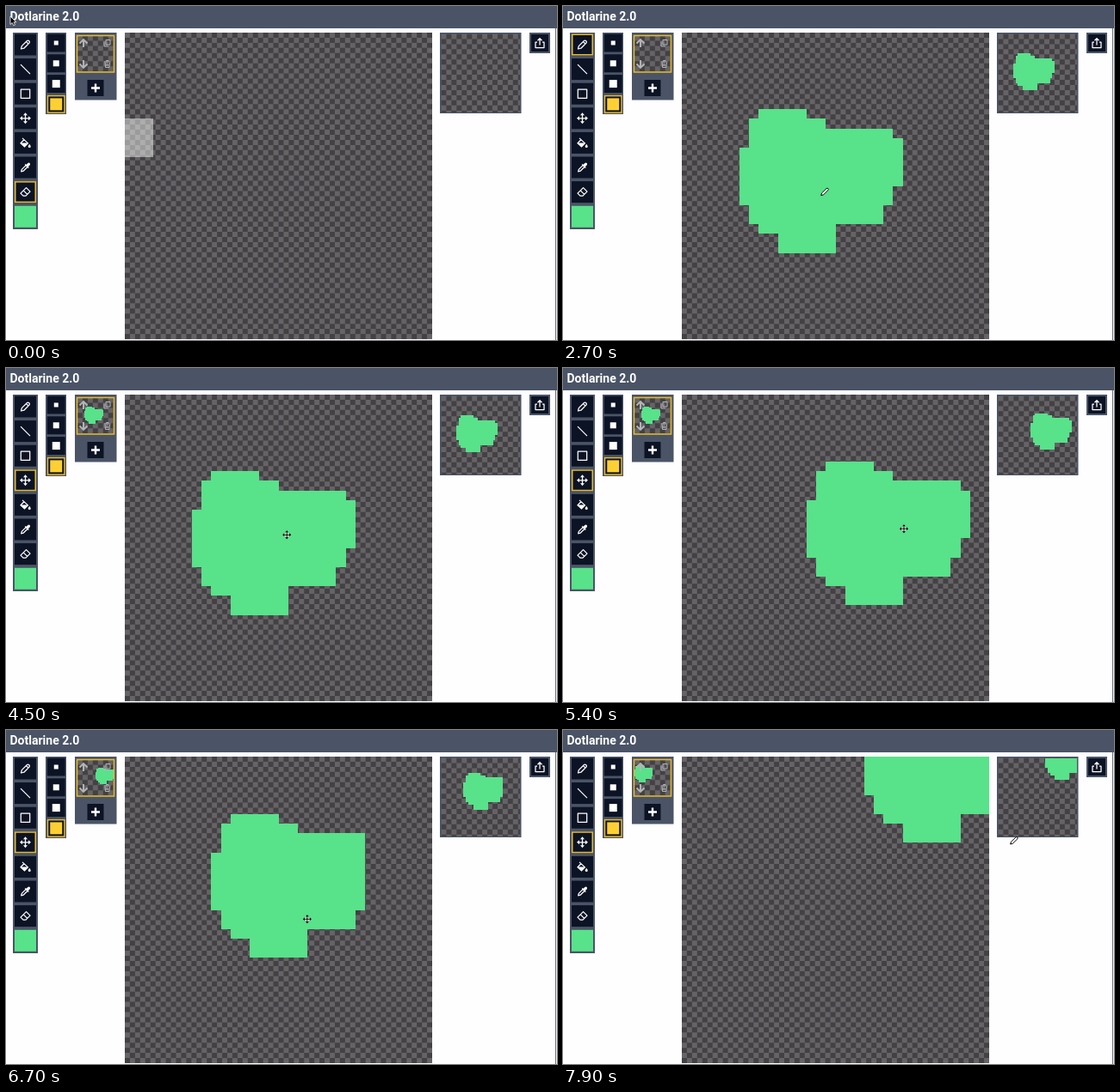
An HTML page that plays this animation: 640 by 389 pixels, repeating every 8000 ms.

```html
<!DOCTYPE html>
<html lang="en">
<head>
<meta charset="utf-8">
<title>Dotlarine 2.0</title>
<style>
  html, body { margin: 0; width: 100%; height: 100%; overflow: hidden; background: #fefdff; }
  #stage { display: block; width: 640px; height: 389px; }
  .slate { fill: #4a5466; }
  .dark { fill: #0c1324; }
  .gold { fill: none; stroke: #e8bb2e; stroke-width: 1.5; }
  .line { fill: none; stroke: #fff; stroke-width: 1.25; stroke-linejoin: round; }
  .solid { fill: #fff; }
  .dim { fill: none; stroke: #b4b6ba; stroke-width: 1; }
  .dim .bold { stroke-width: 1.9; }
  .green { fill: #58e28a; }
  .base { fill: #656366; }
  .tile { fill: #434144; }
  .art, #hover { shape-rendering: crispEdges; }
  text { font: 700 14px Roboto, Arial, sans-serif; fill: #fff; }
</style>
</head>
<body>
<svg id="stage" viewBox="0 0 640 389">
  <rect x="638" width="1" height="389" fill="#666c78"/>
  <rect class="slate" width="640" height="26"/>
  <text x="4.5" y="17">Dotlarine 2.0</text>

  <!-- Tools -->
  <rect class="slate" x="8" y="31" width="29" height="229"/>
  <g id="tools"></g>
  <rect class="green" x="10" y="232.8" width="25" height="25"/>
  <rect id="picked" class="gold" x="10.75" width="23.5" height="23.5"/>

  <!-- Brush sizes -->
  <rect class="slate" x="46" y="31" width="24" height="95"/>
  <g id="sizes"></g>
  <rect class="gold" x="48.5" y="104.65" width="19.5" height="19.5"/>

  <!-- Frame list -->
  <rect class="slate" x="80" y="31" width="48.5" height="78.5"/>
  <svg id="thumb" x="83" y="34.5" width="42" height="42" viewBox="0 0 32 32"></svg>
  <rect class="gold" x="82.5" y="34.5" width="43" height="42.5"/>
  <g class="dim">
    <path class="bold" d="M90 48v-9M85.5 43.5L90 39l4.500 4.500M90 63v9M85.500 67.500L90 72l4.500-4.500"/>
    <path d="M116 39.500h5v5.500h-5zM114 41.500v5.500h5"/>
    <path d="M114 65h7.500M116.500 64.500v-1h2.500v1M115 66l.5 5.500h4.500l.5-5.500M116.800 67.500v2.500M118.700 67.500v2.500"/>
  </g>
  <rect class="dark" x="94.5" y="86" width="19" height="19"/>
  <path d="M104 90.500v10M99 95.500h10" stroke="#fff" stroke-width="2.4"/>

  <!-- Drawing area -->
  <svg id="main" x="138" y="31" width="357" height="357" viewBox="0 0 32 32"></svg>

  <!-- Preview and export -->
  <rect class="slate" x="504" y="31" width="94.5" height="94"/>
  <svg id="preview" x="505.5" y="32.5" width="91.5" height="91.5" viewBox="0 0 32 32"></svg>
  <rect class="slate" x="608" y="31" width="24" height="24"/>
  <rect class="dark" x="610" y="33" width="20" height="20"/>
  <path class="line" d="M617 42h-2v6.500h10V42h-2M620 45.500v-7.500M617.500 40.200l2.500-2.500 2.500 2.500"/>

  <g id="cursor">
    <path id="arrow" d="M0 0v9.500l2.200-2 1.600 3.200 1.700-.8-1.500-3.100h3z" fill="#000" stroke="#fff" stroke-width=".8"/>
    <path id="pen" d="M0 0l.8-2.800 5.400-5.200q1-.9 1.900-.1t.1 1.900L2.800-.9z" fill="#fff" stroke="#000"/>
    <g id="cross">
      <path d="M-4 0H4M0-4V4" stroke="#fff" stroke-width="2.4"/>
      <path d="M-4 0H4M0-4V4" stroke="#000"/>
      <path d="M0-5l2 2h-4zM0 5l2-2h-4zM-5 0l2-2v4zM5 0l-2-2v4z"/>
    </g>
  </g>
</svg>
<script>
const SIDE = 357, CELL = SIDE / 32, LEFT = 138, TOP = 31, CHECK = SIDE / 60;
const LOOP = 8000, STEP = 100, PREVIEW_LAG = 15;
const $ = id => document.getElementById(id);

// Static icons, each centred on its button
const icons = [
  '<path class="line" d="M-5 5l.8-3.400L2-4.500q1-.9 2 0l.5.5q.9 1 0 2L-1.600 4.200zM1-3.400L3.400-1"/>',
  '<path class="line" d="M-5.500-5.500L5.500 5.500"/>',
  '<path class="line" d="M-5.200-5.200H5.200V5.200H-5.200z"/>',
  '<path class="line" d="M-5 0H5M0-5V5"/><path class="solid" d="M0-6.500l2.500 3h-5zM0 6.500l2.500-3h-5zM-6.500 0l3-2.500v5zM6.500 0l-3-2.500v5z"/>',
  '<path class="line" d="M-3.500-5.500l6.500 6-4 4-4.500-4.200 4-4"/><path class="solid" d="M-5.500 0H3l-4 5zM4.700 1.300q3.200 4 0 4.300-3-.3 0-4.300z"/>',
  '<path class="line" d="M-4.800 4.800l.6-2.400L.8-2.600l1.800 1.800-5 5z"/><path class="solid" d="M-.8-3.200l1-.9 1 .9 1.600-1.700q1.300-1 2.300 0t0 2.300L3.400-1l.9 1-1 1z"/>',
  '<path class="line" d="M-5.500 1.500L1-5l4.500 4.500L.5 4.500h-3zM-2.300-1.700L2.200 2.800"/>'
];
const square = (size, attrs) => `<rect x="${-size / 2}" y="${-size / 2}" width="${size}" height="${size}" ${attrs}/>`;
const button = (x, y, size, content) =>
  `<g transform="translate(${x} ${y})">${square(size, 'class="dark"')}${content}</g>`;
const toolY = i => 45 + i * 28.6;
$('tools').innerHTML = icons.map((icon, i) => button(22.5, toolY(i), 25, icon)).join('');
$('sizes').innerHTML = [5, 7, 9, 14].map((s, i) =>
  button(58.25, 43 + i * 23.8, 21, square(s, `fill="${i < 3 ? '#fff' : '#fcd034'}"`))).join('');

// Checkerboard with an empty artwork layer on top
function makeBoard(id) {
  const board = $(id), tile = CHECK * 32 / board.getAttribute('width');
  let d = '';
  for (let r = 0; r * tile < 32; r++)
    for (let c = (r + 1) % 2; c * tile < 32; c += 2)
      d += `M${c * tile} ${r * tile}h${tile}v${tile}h${-tile}z`;
  board.innerHTML = `<rect class="base" width="32" height="32"/><path class="tile" d="${d}"/><path class="green art"/>`;
  return board.querySelector('.art');
}
const [mainArt, previewArt, thumbArt] = ['main', 'preview', 'thumb'].map(makeBoard);
$('main').insertAdjacentHTML('beforeend', '<rect id="hover" fill="#fff" fill-opacity=".47"/>');

// Brush strokes: corners of the route taken by the top-left cell of a 4 x 4 stamp
const fillIn = points => points.flatMap(([x, y], i) => {
  if (!i) return [[x, y]];
  const [px, py] = points[i - 1];
  const n = Math.max(Math.abs(x - px), Math.abs(y - py));
  return Array.from({ length: n }, (_, k) => [
    Math.round(px + (x - px) * (k + 1) / n), Math.round(py + (y - py) * (k + 1) / n)]);
});
const strokes = [
  { from: 450, to: 950, stamps: fillIn([[11, 9], [8, 8], [7, 9], [7, 10], [6, 12], [6, 14], [7, 16],
    [9, 17], [11, 18], [11, 19]]) },
  { from: 1400, to: 2700, stamps: fillIn([[12, 12], [14, 10], [18, 10], [19, 12], [18, 13], [17, 15],
    [17, 16], [12, 16], [12, 19], [10, 19], [10, 17], [8, 17], [8, 13], [14, 13], [12, 15]]) }
];
const stampIndex = (s, t) => t < s.from ? -1
  : Math.floor(Math.min(1, (t - s.from) / (s.to - s.from)) * (s.stamps.length - 1));

function painted(t) {
  const grid = new Set();
  for (const s of strokes)
    for (const [x, y] of s.stamps.slice(0, stampIndex(s, t) + 1))
      for (let k = 0; k < 16; k++) grid.add((y + (k >> 2)) * 32 + x + k % 4);
  return grid;
}

function shift(grid, dx, dy) {
  const out = new Set();
  for (const i of grid) {
    const x = i % 32 + dx, y = (i >> 5) + dy;
    if (x >= 0 && x < 32 && y >= 0 && y < 32) out.add(y * 32 + x);
  }
  return out;
}

// Merge neighbouring cells of a row into one rectangle
function toPath(grid) {
  let d = '';
  for (let y = 0; y < 32; y++)
    for (let x = 0; x < 32; x++) {
      const start = x;
      while (x < 32 && grid.has(y * 32 + x)) x++;
      if (x > start) d += `M${start} ${y}h${x - start}v1h${start - x}z`;
    }
  return d;
}

// Pointer stops: time, x, y
const stops = [
  [0, 5, 12], [300, 22, 45], [450, 288, 154], [950, 288, 265], [1300, 298, 187], [2800, 300, 219],
  [3300, 22, 131], [4420, 320, 195], [5800, 427, 184], [6300, 429, 230], [7200, 251, 208],
  [7300, 251, 193], [7400, 218, 104], [7700, 463, 71], [LOOP, 548, 164]
];
function pointer(t) {
  const s = strokes.find(s => t >= s.from && t <= s.to);
  if (s) {
    const [x, y] = s.stamps[stampIndex(s, t)];
    return [LEFT + (x + 2.5) * CELL, TOP + (y + 2) * CELL];
  }
  const i = stops.findIndex(p => p[0] > t);
  const [t0, x0, y0] = stops[i - 1], [t1, x1, y1] = stops[i];
  const k = (t - t0) / (t1 - t0);
  return [x0 + (x1 - x0) * k, y0 + (y1 - y0) * k];
}

// Drags move the artwork in whole cells; cells pushed out are lost on release
const drags = [[4420, 5800], [6300, 7200], [7300, 7700]];
function drag(grid, [from, to], t) {
  if (t < from) return grid;
  const [ax, ay] = pointer(from), [x, y] = pointer(Math.min(t, to));
  return shift(grid, Math.round((x - ax) / CELL), Math.round((y - ay) / CELL));
}
const artwork = t => drags.reduce((grid, d) => drag(grid, d, t), painted(t));

// The frame list is refreshed whenever the button is released
const releases = [0, 2800, 5800, 7200];
const saved = t => artwork(releases.findLast(r => t >= r));

const held = t => (t >= 450 && t < 2800) || t >= 7300 || drags.some(([a, b]) => t > a && t < b);
const clamp = v => Math.max(0, Math.min(31, Math.floor(v)));

function drawHover(t, x, y, moving) {
  const size = moving ? 1 : 4, back = moving ? 0 : 2;
  // Until the pointer enters the board, the outline rests where it last left
  const [col, row] = t < 450 ? [-1, 9] : [clamp((x - LEFT) / CELL) - back, clamp((y - TOP) / CELL) - back];
  const attrs = { x: col, y: row, width: size, height: size, visibility: held(t) ? 'hidden' : 'visible' };
  for (const name in attrs) $('hover').setAttribute(name, attrs[name]);
}

function draw(t) {
  const [x, y] = pointer(t), moving = t >= 3300;
  mainArt.setAttribute('d', toPath(artwork(t)));
  previewArt.setAttribute('d', toPath(artwork(Math.max(0, t - PREVIEW_LAG))));
  thumbArt.setAttribute('d', toPath(saved(t)));
  drawHover(t, x, y, moving);

  const tool = t < 300 ? 6 : moving ? 3 : 0;
  $('picked').setAttribute('y', toolY(tool) - 11.75);
  const shape = x < LEFT ? 'arrow' : moving && x < LEFT + SIDE ? 'cross' : 'pen';
  for (const id of ['arrow', 'pen', 'cross']) $(id).style.display = id === shape ? '' : 'none';
  $('cursor').setAttribute('transform', `translate(${x} ${y})`);
}

let shown = -1;
function tick() {
  const t = Math.floor(performance.now() % LOOP / STEP) * STEP;
  if (t !== shown) draw(shown = t);
  requestAnimationFrame(tick);
}
tick();
</script>
</body>
</html>
```
